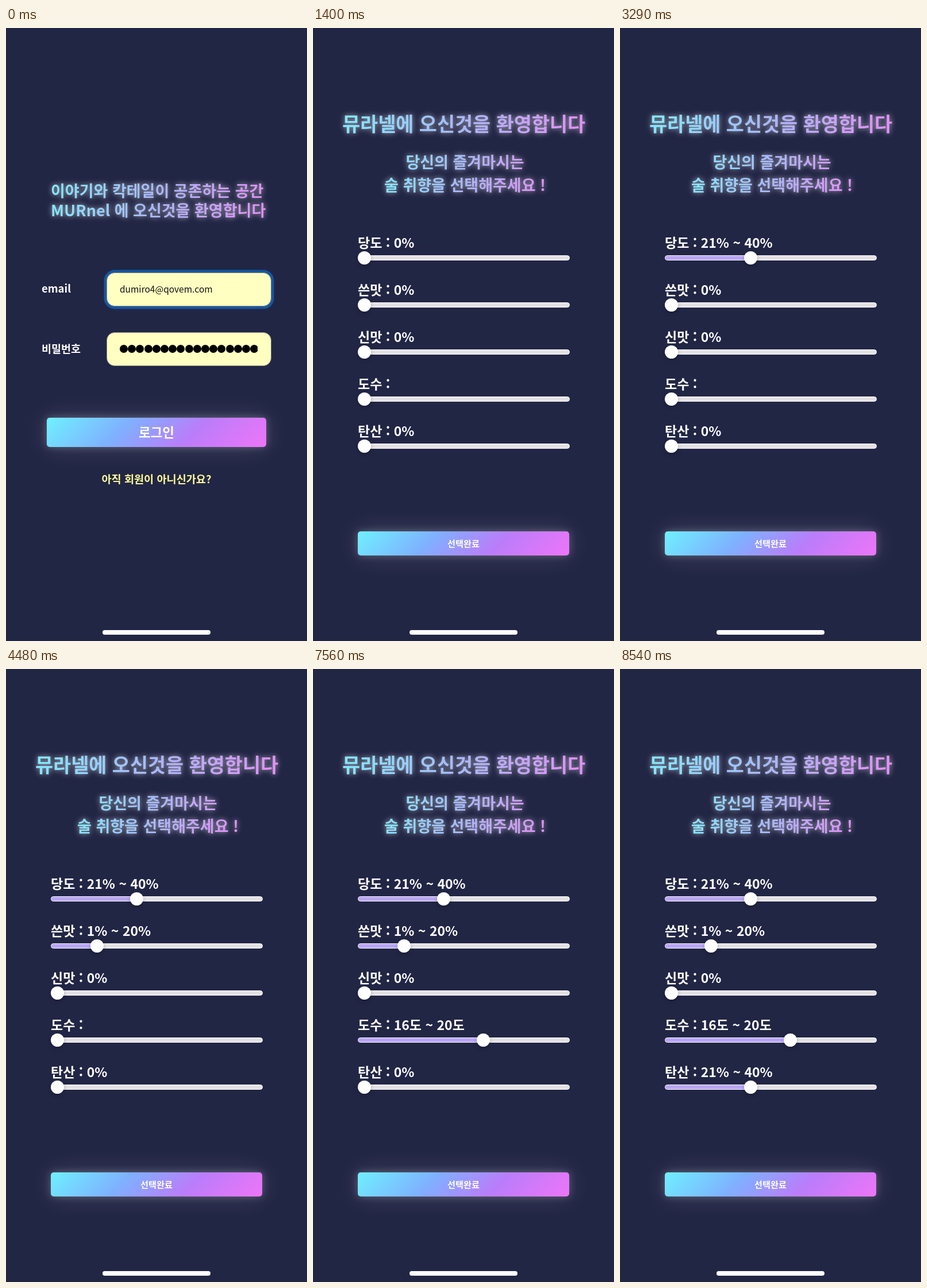
An HTML page for the animation above (9030 ms loop, 524 px wide and 1068 px high).

```html
<!DOCTYPE html>
<html lang="ko">
<head>
<meta charset="utf-8">
<title>Login and taste survey</title>
<style>
  html, body { margin: 0; width: 100%; height: 100%; overflow: hidden; background: #222645; }
  body { position: relative; font-family: "Noto Sans CJK KR", "Noto Sans CJK", sans-serif; font-weight: 700; color: #fff; }
  div { position: absolute; box-sizing: border-box; white-space: pre; }
  [hidden] { display: none; }
  .screen { left: 0; top: 0; width: 524px; height: 1068px; }
  .title {
    background: linear-gradient(100deg, #80eafc, #a8b8fb 48%, #e58df6);
    -webkit-background-clip: text; background-clip: text; color: transparent;
    filter: drop-shadow(0 0 4px rgba(255, 255, 255, .4)) drop-shadow(0 0 6px rgba(255, 255, 255, .22));
  }
  .button {
    border-radius: 5px; text-align: center;
    background: linear-gradient(135deg, #6ff0ff, #7fb0ff 35%, #ba7dfa 65%, #ee75f8);
    box-shadow: 0 0 14px rgba(255, 255, 255, .25), 0 0 46px rgba(255, 255, 255, .14);
  }
  .input { left: 175px; width: 287px; height: 59px; border: 1.5px solid #85857a; border-radius: 14px; background: #feffc1; }
  .focus { box-shadow: 0 0 0 4.5px #1557a3; }
  .clip { left: 198px; top: 551px; width: 240px; height: 16px; overflow: hidden; }
  .dot { top: 1px; width: 14px; height: 14px; border-radius: 50%; background: #000; }
  .label { left: 62px; font-size: 18.5px; line-height: 30px; }
  .row { left: 78px; font-size: 23px; line-height: 36px; }
  .track { left: 78px; width: 369px; height: 9px; border: 1.5px solid #fff; border-radius: 5px; background: #e4e1e4; overflow: hidden; }
  .fill { left: 0; top: 0; height: 100%; background: #b9a6f8; }
  .thumb { width: 23px; height: 23px; border-radius: 50%; background: #fff; box-shadow: 0 3px 7px rgba(0, 0, 0, .25); }
  .home { left: 168px; top: 1049px; width: 188px; height: 8px; border-radius: 4px; background: #fff; }
</style>
</head>
<body>
<div class="screen" id="login">
  <div class="title" style="left:78px;top:266px;font-size:27px;line-height:34px">이야기와 칵테일이 공존하는 공간
MURnel 에 오신것을 환영합니다</div>
  <div class="label" style="top:438px">email</div>
  <div class="input" id="email" style="top:425.5px"></div>
  <div style="left:198px;top:440px;font-size:15.5px;line-height:28px;font-weight:500;color:#111">dumiro4@qovem.com</div>
  <div class="label" style="top:543px">비밀번호</div>
  <div class="input" style="top:530px"></div>
  <div class="clip" id="dots"></div>
  <div class="button" style="left:71px;top:679px;width:382px;height:51px;font-size:22.5px;line-height:48px">로그인</div>
  <div style="left:0;top:770px;width:524px;text-align:center;font-size:18.6px;line-height:30px;color:#fdfb98">아직 회원이 아니신가요?</div>
</div>
<div class="screen" id="survey" hidden>
  <div class="title" style="left:51px;top:141px;font-size:33.8px;line-height:50px">뮤라넬에 오신것을 환영합니다</div>
  <div class="title" style="left:124px;top:213px;font-size:27px;line-height:40px;text-align:center">당신의 즐겨마시는
술 취향을 선택해주세요 !</div>
  <div class="button" style="left:78px;top:877px;width:368px;height:42px;font-size:15.2px;line-height:40px">선택완료</div>
</div>
<div class="home"></div>
<script>
const LOOP = 9030, BLUR = 630, SWITCH = 1400;
const percent = ['0%', '1% ~ 20%', '21% ~ 40%'];
const degree = ['', '1도 ~ 10도', '11도 ~ 15도', '16도 ~ 20도'];
// Each slider: name, value names, times at which it moves up one step
const sliders = [
  ['당도', percent, [2870, 3080]],
  ['쓴맛', percent, [4340]],
  ['신맛', percent, []],
  ['도수', degree, [5320, 5530, 6510]],
  ['탄산', percent, [7770, 7980]]
];
const $ = id => document.getElementById(id);

function add(parent, cls, style = {}) {
  const el = document.createElement('div');
  el.className = cls;
  for (const key in style) el.style[key] = style[key] + 'px';
  return parent.appendChild(el);
}

for (let i = 0; i < 17; i++) add($('dots'), 'dot', { left: i * 14.2 });

const rows = sliders.map(([name, values, times], i) => {
  const y = 400.8 + i * 81.9;
  const label = add($('survey'), 'row', { top: y - 45.5 });
  const track = add($('survey'), 'track', { top: y - 4.5 });
  return {
    name, values, times, label,
    fill: add(track, 'fill'),
    thumb: add($('survey'), 'thumb', { top: y - 11.5 })
  };
});

function draw(t) {
  $('login').hidden = t >= SWITCH;
  $('survey').hidden = t < SWITCH;
  $('email').classList.toggle('focus', t < BLUR);
  for (const r of rows) {
    const step = r.times.filter(at => t >= at).length;
    const x = 11 + step * 69.2;
    r.label.textContent = `${r.name} : ${r.values[step]}`;
    r.fill.style.width = (step ? x : 0) + 'px';
    r.thumb.style.left = 78 + x - 11.5 + 'px';
  }
}

function tick() {
  draw(performance.now() % LOOP);
  requestAnimationFrame(tick);
}
tick();
</script>
</body>
</html>
```
